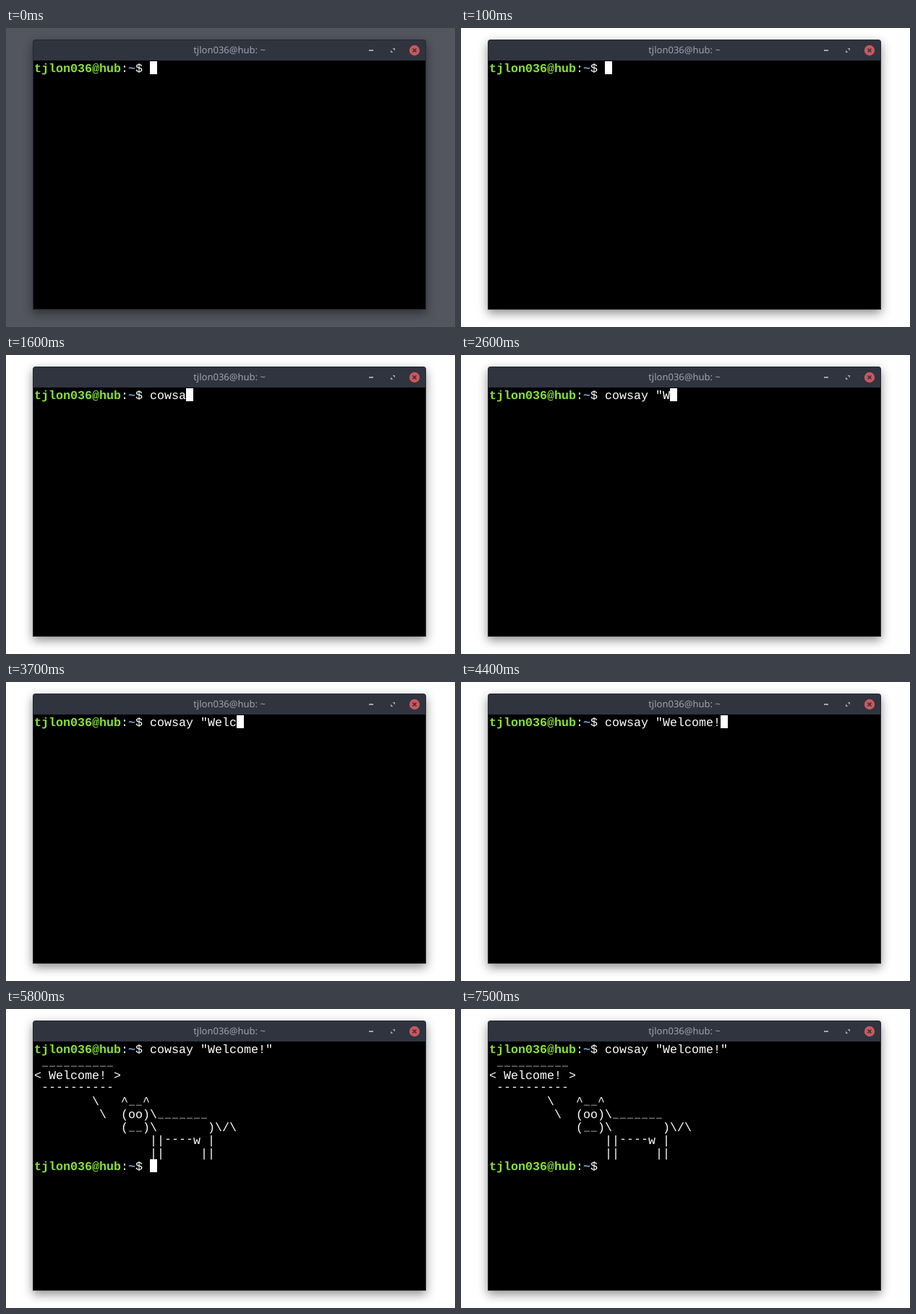
These frames come from a looping animation (621 by 414 pixels, 8000 ms). An HTML page:

```html
<!DOCTYPE html>
<html lang="en">
<head>
<meta charset="utf-8">
<title>Terminal</title>
<style>
  html, body { margin: 0; width: 100%; height: 100%; overflow: hidden; background: #fff; }
  svg { display: block; width: 621px; height: 414px; }
  text { white-space: pre; text-rendering: geometricPrecision; }
  .mono { font: 16.667px "Liberation Mono", monospace; fill: #fff; }
  .under { font-size: 13.333px; letter-spacing: 2px; }
  .dash { font-family: "DejaVu Sans Mono", monospace; font-size: 16.61px; }
  .user { fill: #8ae234; font-weight: bold; }
  .path { fill: #729fcf; font-weight: bold; }
  .title { font: 13px "Noto Sans", sans-serif; fill: #9da3b0; text-anchor: middle; }
  .window { filter: drop-shadow(0 5px 7px rgba(0, 0, 0, .45)); }
</style>
</head>
<body>
<svg viewBox="0 0 621 414">
  <rect id="desk" width="621" height="414" fill="#53565f"/>
  <path class="window" d="M37 390V20q0-4 4-4H577q4 0 4 4V390z" fill="#23262e"/>
  <path d="M38 45V20q0-3 3-3H577q3 0 3 3V45z" fill="#2f343f"/>
  <rect x="38" y="45" width="542" height="344" fill="#000"/>
  <text class="title" x="309" y="35">tjlon036@hub: ~</text>
  <rect x="502" y="30" width="6" height="2" fill="#a0a5b0"/>
  <path d="M534.5 28H538V31.5zM532 30.5V34H535.5z" fill="#a0a5b0"/>
  <circle cx="565" cy="31" r="7.2" fill="#cc575d"/>
  <path d="M562.5 28.5l5 5m0-5l-5 5" stroke="#2f343f" stroke-width="1.7"/>
  <g id="screen"></g>
  <rect id="cursor" width="10" height="18" fill="#fff"/>
</svg>
<script>
const LOOP = 8000, LEFT = 39, TOP = 46, CELL_W = 10, CELL_H = 18, PROMPT_COLS = 16;
const COMMAND = 'cowsay "Welcome!"';
const KEY_TIMES = [800, 1100, 1300, 1400, 1600, 1800, 1900, 2300, 2600,
                   2900, 3200, 3700, 3800, 3900, 4100, 4400, 4700];
const ENTER = 5600, OUTPUT = 5800;
const CURSOR_OFF = [[300, 800], [5400, 5600], [6300, 6900], [7500, LOOP]];
const COW = String.raw` __________
< Welcome! >
 ----------
        \   ^__^
         \  (oo)\_______
            (__)\       )\/\
                ||----w |
                ||     ||`.split('\n');

const $ = id => document.getElementById(id);

function add(parent, tag, attrs = {}, content = '') {
  const node = document.createElementNS('http://www.w3.org/2000/svg', tag);
  for (const name in attrs) node.setAttribute(name, attrs[name]);
  node.textContent = content;
  return parent.appendChild(node);
}

function addText(parent, col, row, content, style = '', dx = 0, dy = 0) {
  return add(parent, 'text', {
    class: 'mono ' + style,
    x: LEFT + col * CELL_W + dx,
    y: TOP + row * CELL_H + 15 + dy
  }, content);
}

function addPrompt(parent, row) {
  addText(parent, 0, row, 'tjlon036@hub', 'user');
  addText(parent, 12, row, ':');
  addText(parent, 13, row, '~', 'path');
  addText(parent, 14, row, '$');
}

// Rules and dashes sit higher in their cells than the other characters.
function addArt(parent, row, line) {
  const only = pattern => line.replace(pattern, ' ');
  addText(parent, 0, row, only(/[_-]/g));
  if (line.includes('_')) addText(parent, 0, row, only(/[^_]/g), 'under', 1, -1);
  if (line.includes('-')) addText(parent, 0, row, only(/[^-]/g), 'dash', 0, -2);
}

const screen = $('screen');
addPrompt(screen, 0);
const typed = addText(screen, PROMPT_COLS, 0, '');
const output = add(screen, 'g');
COW.forEach((line, i) => addArt(output, i + 1, line));
addPrompt(output, COW.length + 1);

function draw(t) {
  const count = KEY_TIMES.filter(time => time <= t).length;
  const [col, row] = t >= OUTPUT ? [PROMPT_COLS, COW.length + 1]
    : t >= ENTER ? [0, 1]
    : [PROMPT_COLS + count, 0];
  const hidden = CURSOR_OFF.some(([from, to]) => t >= from && t < to);

  $('desk').setAttribute('fill', t < 100 ? '#53565f' : '#fff');
  typed.textContent = COMMAND.slice(0, count);
  output.setAttribute('visibility', t >= OUTPUT ? 'visible' : 'hidden');
  const cursor = $('cursor');
  cursor.setAttribute('x', LEFT + col * CELL_W);
  cursor.setAttribute('y', TOP + row * CELL_H);
  cursor.setAttribute('visibility', hidden ? 'hidden' : 'visible');
}

function tick() {
  draw(performance.now() % LOOP);
  requestAnimationFrame(tick);
}
tick();
</script>
</body>
</html>
```
